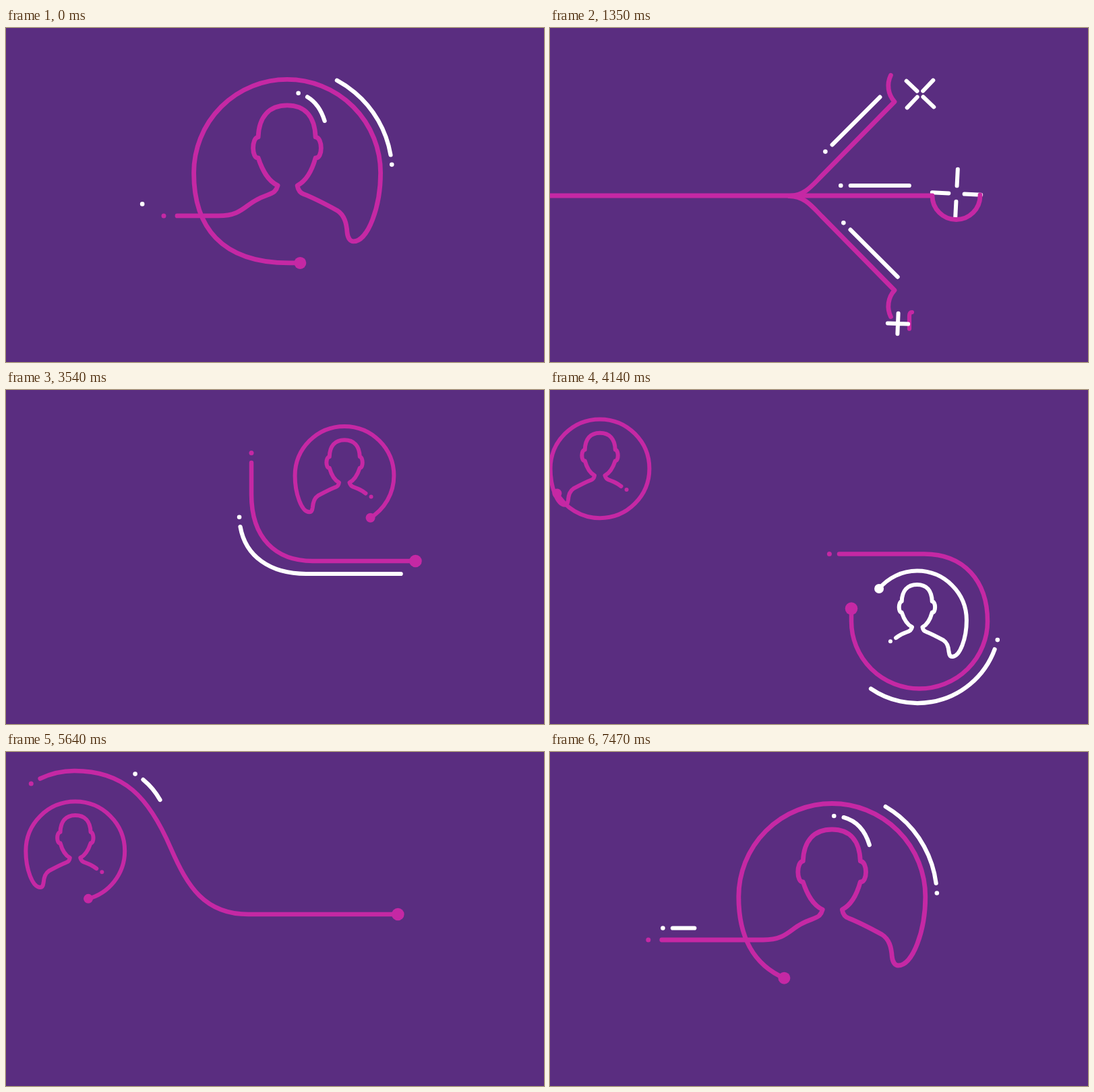
An HTML page with a canvas that plays this animation: 798x496 px, repeating every 7.53 s.

```html
<!DOCTYPE html>
<html lang="en">
<head>
<meta charset="utf-8">
<title>Connected people</title>
<style>
  html, body { margin: 0; width: 100%; height: 100%; overflow: hidden; background: #5a2d80; }
  canvas { display: block; }
</style>
</head>
<body>
<canvas id="stage" width="798" height="496"></canvas>
<script>
const ctx = document.getElementById('stage').getContext('2d');
const LOOP = 7530, BG = '#5a2d80', PINK = '#c528a4', WHITE = '#fff';

const clamp = (v, lo, hi) => Math.min(hi, Math.max(lo, v));
const easeInOut = p => p < 0.5 ? 4 * p ** 3 : 1 - 4 * (1 - p) ** 3;

// Distance covered at time dt: steady speed after zero, braking before it.
const glide = (speed, dt, brake = 0.0005) => speed * dt - (dt < 0 ? brake * dt * dt : 0);

// Linear walk through values reached at the given times.
function walk(times, values, t) {
  let i = 0;
  while (i < times.length - 2 && t > times[i + 1]) i++;
  const p = clamp((t - times[i]) / (times[i + 1] - times[i]), 0, 1);
  return values[i] + (values[i + 1] - values[i]) * p;
}

function makePath(d) {
  const el = document.createElementNS('http://www.w3.org/2000/svg', 'path');
  el.setAttribute('d', d);
  return { shape: new Path2D(d), len: el.getTotalLength(), at: s => el.getPointAtLength(s) };
}

function dot(p, r) {
  ctx.beginPath();
  ctx.arc(p.x, p.y, r, 0, Math.PI * 2);
  ctx.fill();
}

// Part of a path from tail to head, a small dot behind it and a knob in front.
function trace(path, tail, head, { color = PINK, width = 6.8, gap = 0, speck = 3.5, knob = 0 } = {}) {
  head = Math.min(head, path.len);
  ctx.strokeStyle = ctx.fillStyle = color;
  ctx.lineWidth = width;
  if (gap && tail > gap && tail - gap < head) dot(path.at(tail - gap), speck);
  tail = Math.max(0, tail);
  if (head <= tail) return;
  ctx.setLineDash([head - tail, path.len + 99]);
  ctx.lineDashOffset = -tail;
  ctx.stroke(path.shape);
  ctx.setLineDash([]);
  if (knob > 0) dot(path.at(head), knob);
}

function shifted([x, y], draw) {
  ctx.save();
  ctx.translate(x, y);
  draw();
  ctx.restore();
}

// World positions of the views, and the camera moves that join them
const HOME = [0, 0], FORK = [1450, 100], BEND = [1622, 1295], RING = [2050, 1305.5], WAVE = [2513, 884];
const moves = [
  { from: -50, to: 810, dx: 1451.3, dy: 100 },
  { from: 2021, to: 3300, dx: 0, dy: 1195 },
  { from: 2490, to: 3400, dx: 172, dy: 0 },
  { from: 3560, to: 4140, dx: 428, dy: 10.5 },
  { from: 4180, to: 4980, dx: 0, dy: -421.5 },
  { from: 4140, to: 5640, dx: 429.1, dy: 0 },
  { from: 5450, to: 6480, dx: 1350, dy: 0 }
];

function aimCamera(t) {
  let x = -1.3, y = 0;
  for (const { from, to, dx, dy } of moves) {
    const p = easeInOut(clamp((t - from) / (to - from), 0, 1));
    x += dx * p;
    y += dy * p;
  }
  ctx.translate(-x, -y);
}

// Person: shoulder, head, shoulder, then over the circle to its left side
const R = 138.5;
const BODY = 'C348 279 354 264 372 255 C385 248 392 248 398 243 C401 240 402 238 403 234 '
  + 'C388 227 380 211 374 193 C364 194 364 163 374 162 '
  + 'C375 132 390 115 417 115 C444 115 458 132 459 162 C470 163 470 194 459 193 '
  + 'C454 211 446 227 432 234 C433 240 435 245 442 247 C455 252 480 265 491 271 '
  + 'C502 278 505 290 506 304 C507 313 511 317 515 317 C537 317 555.5 265 555.5 215 '
  + `A${R} ${R} 0 0 0 278.5 215 `;
const entry = 'M-200 279 H315 ' + BODY + 'C278.5 294 318 349 420 349 ';
const bodyEnd = makePath(entry).len;
const forkEnd = bodyEnd + 1597;
const mainLine = makePath(entry + 'H2017 A35.5 35.5 0 0 0 2088 349 A35.5 35.5 0 0 0 2017 349');
const smallPerson = makePath('M315 279 ' + BODY + `A${R} ${R} 0 0 0 555.5 215`);

function drawMainLine(t) {
  const run = bodyEnd + 15 + glide(t < 0 ? 1.48 : 1.253, t, 0.00095);
  const limit = Math.max(forkEnd, mainLine.len - Math.max(0, t - 1900) / 2);
  const tail = 453 + t * (t < 0 ? 1.5 : 0.9);
  const knob = clamp((1130 - t) / 8, 0, 9);
  trace(mainLine, tail, Math.min(run, limit), { gap: 20, knob });
}

// Forked branches, mirrored about the main line
const branches = [1, -1].map(s => {
  const y = v => 249.5 - s * v;
  const stem = `M355 249.5 C378 249.5 390 ${y(17)} 404 ${y(31)} L511 ${y(140)} `;
  const arc = `A35.4 35.4 0 0 ${s > 0 ? 1 : 0} `;
  return { stem: makePath(stem).len, path: makePath(stem + arc + `561 ${y(190)} ` + arc + `511 ${y(140)}`) };
});

// Long line through the remaining views; mark[i] is its length after leg i
const legs = ['M1986 550 V1450 ', 'C1986 1515 2022 1549 2077 1549 ', 'H2605 ',
  'C2664 1549 2699 1589 2699 1649 A101 100 0 0 1 2598 1749 A101 100 0 0 1 2497 1649 ',
  'V1030 ', 'A118 118 0 0 1 2615 912 ',
  'C2688 912 2725 950 2758 1027 C2783 1084 2808 1125 2873 1125 '];
const mark = legs.map((_, i) => makePath(legs.slice(0, i + 1).join('')).len);
const longLine = makePath(legs.join('') + 'H4200');
const stops = [2560, 3540, 4140, 5640, 6480];
const heads = [0, mark[1] + 151, mark[3] + 18, mark[6] + 221, mark[6] + 927];
const tails = [-100, mark[0] - 48, mark[2] - 127, mark[5] - 55, mark[6] + 927];

// Strips sliding along a path; tail and head are their ends at time `at`
const strip = (view, d, at, tail, head, speed, color = WHITE) =>
  ({ view, path: makePath(d), at, tail, head, speed, color });
const strips = [
  strip(HOME, 'M551.7 292.8 A155.5 155.5 0 0 0 317 95.9', 0, 108, 249, 0.08),
  strip(HOME, 'M400 95 H418 C445 95 464 110 472.5 138', 0, 48, 170, 0.2),
  strip(HOME, 'M0 261.5 H213', 0, 216, 600, 0.57),
  strip(HOME, 'M480 368 H1500', 300, 150, 350, 1.2),
  strip(FORK, 'M370 222 L500 92', 1350, 68, 168, 0.8),
  strip(FORK, 'M380 234 H560', 1350, 65, 152, 0.8),
  strip(FORK, 'M380 234 L530 384', 1350, 92, 191, 0.8),
  strip(FORK, 'M533 447 V428 Q533 422 537 422', 1350, 0, 30, 0.3, PINK),
  strip(BEND, 'M346 60 V185 C346 240 385 273 445 273 H900', 3540, 142, 414, 1.2),
  strip(RING, 'M638.5 264.6 A122 122 0 1 1 430.4 301.3', 4140, 127, 349, 1),
  strip(WAVE, 'M103 11 C161 11 206 30 229 71', 5640, 107, 160, 0.4)
];

function drawStrip({ view, path, at, tail, head, speed, color }, t) {
  const shift = glide(speed, t - at);
  shifted(view, () => trace(path, tail + shift, head + shift, { color, width: 6.2, gap: 14.5, speck: 3.3 }));
}

// Four rays flying outwards: x, y, turn, start time
const bursts = [[549, 98, 0.76, 1190], [603, 246, 0.05, 1143], [516, 439, 0.04, 1264]];

function burst([x, y, turn, start], t) {
  const p = (t - start) / 450;
  if (p <= 0 || p >= 1) return;
  const outer = 47 * Math.min(1, p / 0.6);
  const inner = 47 * Math.max(0, (p - 0.2) / 0.8) ** 1.25;
  ctx.save();
  ctx.translate(x, y);
  ctx.rotate(turn);
  ctx.strokeStyle = WHITE;
  ctx.lineWidth = 6;
  ctx.beginPath();
  for (let i = 0; i < 4; i++) {
    ctx.moveTo(inner, 0);
    ctx.lineTo(outer, 0);
    ctx.rotate(Math.PI / 2);
  }
  ctx.stroke();
  ctx.restore();
}

const people = [
  { x: 1705, y: 556, flip: 1, color: WHITE, start: 2471 },
  { x: 2124, y: 1422.3, flip: -1, color: PINK, start: 3117 },
  { x: 2594.5, y: 1647.5, flip: 1, color: WHITE, start: 3880 },
  { x: 2616.3, y: 1031, flip: -1, color: PINK, start: 5174 }
];

function person({ x, y, flip, color, start }, t) {
  if (t <= start) return;
  const k = 0.53;
  const angle = 5.9 - 10.34 * Math.exp((start - t) / 238);   // where the knob is on the circle
  ctx.save();
  ctx.translate(x, y);
  ctx.scale(flip * k, k);
  ctx.translate(-417, -215);
  trace(smallPerson, 46, smallPerson.len - (2 * Math.PI - angle) * R,
    { color, width: 6 / k, gap: 18, speck: 3 / k, knob: 7 / k });
  ctx.restore();
}

function render(t) {
  ctx.setTransform(1, 0, 0, 1, 0, 0);
  ctx.fillStyle = BG;
  ctx.fillRect(0, 0, 798, 496);
  ctx.lineCap = ctx.lineJoin = 'round';
  aimCamera(t);

  strips.forEach(s => drawStrip(s, t));
  shifted(FORK, () => {
    for (const b of bursts) {
      burst(b, t);
      burst(b, t - 560);
    }
  });
  drawMainLine(t);
  shifted(FORK, () => {
    for (const { path, stem } of branches) trace(path, 0, stem + 41 + 0.9 * (t - 1350));
  });
  trace(longLine, walk(stops, tails, t), walk(stops, heads, t), { width: 6.5, gap: 14.5, knob: 9.3 });
  people.forEach(p => person(p, t));
}

function frame() {
  const t = performance.now() % LOOP;
  render(t > 6500 ? t - LOOP : t);   // the first scene starts before zero
  requestAnimationFrame(frame);
}
frame();
</script>
</body>
</html>
```
